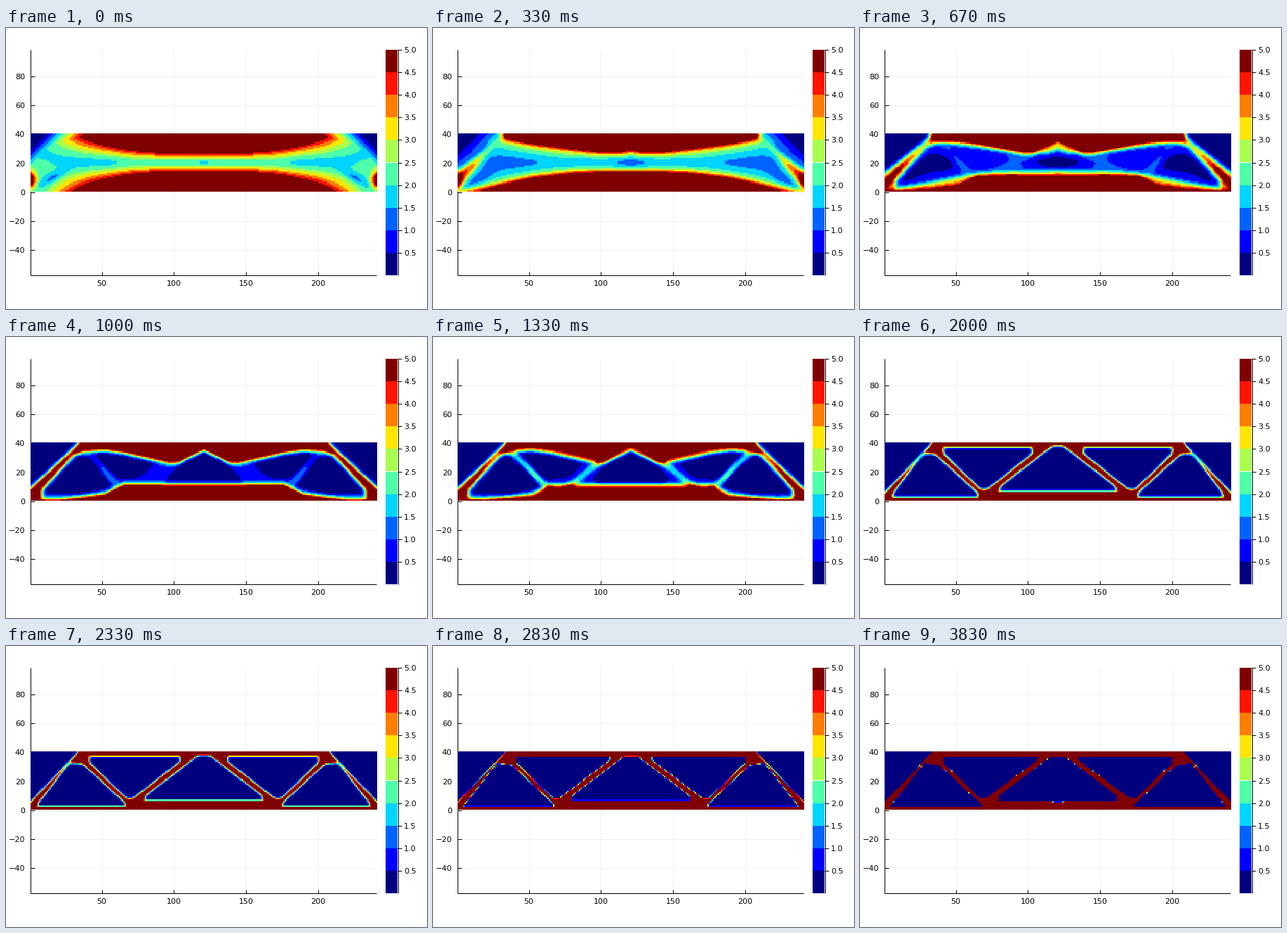
Write a matplotlib script that moves like this. It is 600 by 400 pixels and loops after 4.17 s.

```python
import numpy as np
import matplotlib.pyplot as plt
from matplotlib.animation import FuncAnimation
from matplotlib.patches import Rectangle

plt.rcParams["font.family"] = "DejaVu Sans"
FRAMES, LOOP_MS = 25, 4170
CELL = 493.1 / 240
LEFT, RIGHT, TOP, BOTTOM = 34.8, 527.9, 31, 352

# Left half of the 240 x 40 beam; the right half is its mirror image.
X, Y = np.meshgrid(np.arange(1.0, 121), np.arange(1.0, 41))


def soft_min(fields, r):
    return -r * np.logaddexp.reduce(-np.array(fields) / r)


def beside(a, b):
    """Distance to the line a-b, positive on its right."""
    ex, ey = b[0] - a[0], b[1] - a[1]
    return ((X - a[0]) * ey - (Y - a[1]) * ex) / np.hypot(ex, ey)


def opening(corners, r):
    """Depth inside a convex, clockwise polygon with corners rounded by r."""
    ends = np.roll(corners, -1, axis=0)
    return soft_min([beside(a, b) for a, b in zip(corners, ends)], r)


def corner_void(x, low, high, r=0.8):
    """Depth inside the empty upper corner left of x, above a slanted edge."""
    return soft_min([x - X, -beside((0, low), (x, high))], r)


def solid(depths, softness):
    """1 in the material, 0 in the openings, with soft edges."""
    return np.prod([0.5 - 0.5 * np.tanh(d / (2 * softness)) for d in depths], axis=0)


def bump(cx, cy, rx, ry, slant=0.0):
    dy = Y - cy - slant * (X - cx)
    return np.exp(-((X - cx) / rx) ** 2 - (dy / ry) ** 2)


def bending_beam():
    w = Y - 20.5
    bend = 0.007 * np.minimum(X, 97) * np.abs(w) * np.where(w < 0, 1.05, 1)
    shear = 1.85 + 0.35 * np.clip((X - 54) / 16, 0, 1) - 0.35 * bump(120, 21, 4, 4)
    v = np.hypot(bend, shear)
    v += 0.35 * bump(0, 18, 18, 6) - 0.85 * bump(16, 10, 9, 3.2, 0.5)
    v = np.minimum(v, np.maximum(0.5 + 0.165 * (X + 40 - Y - 12.5), 0))
    return v + 4 * bump(0, 8.5, 4.5, 6)


def hollowing_beam():
    corner = corner_void(31.5, 13, 37)
    roof = np.interp(X, [30, 50, 100, 113, 120], [36.5, 33.5, 27.5, 27.5, 29.5])
    base = np.interp(X, [5, 52, 81, 120], [1, 10.5, 13.5, 14.5])
    core = soft_min([roof - Y, Y - base, beside((5, 8), (24, 32))], 0.6)
    floor = (1.2 - 0.45 * bump(34, 20, 18, 7) - 0.6 * bump(20, 13, 9, 5, 0.6)
             - 0.8 * bump(120.5, 20, 13, 5))
    return 6 * solid([corner, core], 1.2) + floor * solid([corner], 1.2)


def budding_struts():
    corner = corner_void(34.5, 8, 40)
    roof = np.interp(X, [30, 38, 52, 66, 97, 103, 120],
                     [32, 34.5, 35.5, 33.5, 26.5, 27, 35])
    base = np.interp(X, [10, 19, 37, 52, 59, 65], [1.5, 1.2, 3, 5, 8.5, 11.5])
    core = soft_min([roof - Y, Y - base, X - 8, beside((8.5, 9), (30, 32))], 0.5)
    lenses = [
        opening([(9, 6), (32, 32), (41, 31), (57, 10), (37, 4.5)], 0.8),
        opening([(43, 33.5), (60, 33), (87, 26.5), (75, 16), (62, 15)], 0.8),
        opening([(94, 12), (94, 15), (106, 28), (120.5, 36),
                 (135, 28), (147, 15), (147, 12)], 0.8),
    ]
    floor = 0.8 + 0.5 * bump(55, 17, 9, 5, -0.9)
    return 6 * solid([corner, core], 1.0) + floor * solid([corner] + lenses, 0.8)


# Corners of each opening when the truss appears and when it has settled.
SIDE = (np.array([(6, 2.8), (6.5, 6.5), (27, 33), (35, 33), (65, 6), (65, 2.8)]),
        np.array([(4.3, 2.5), (4.6, 3), (28, 32.5), (39, 30.8), (67.3, 4.2), (67.3, 2.5)]))
INNER = (np.array([(41, 33), (41, 37.2), (102, 37.2), (103, 33), (72, 8), (67, 8)]),
         np.array([(41.5, 32.3), (41.5, 36.5), (106.8, 36.5), (106.8, 35), (70.7, 8.2), (66.5, 8.2)]))
MIDDLE = (np.array([(79, 6.8), (80, 10), (117, 38.5), (124, 38.5), (161, 10), (162, 6.8)]),
          np.array([(79.5, 6.5), (79.5, 10), (115, 36.5), (126, 36.5), (161.5, 10), (161.5, 6.5)]))


def truss(n):
    f = np.clip((n - 10) / 7, 0, 1)
    times = [10, 14, 17, 20]
    r = np.interp(n, times, [0.8, 0.4, 0.08, 0.03])
    softness = np.interp(n, times, [0.65, 0.42, 0.12, 0.02])
    depths = [opening((1 - f) * a + f * b, r) for a, b in (SIDE, INNER, MIDDLE)]
    v = 6 * solid(depths + [corner_void(33.3, 5.1, 39.6, r)], softness)
    if n >= 17:
        # The lower chord's top row fills in from its ends towards the middle.
        x = X[5, 82:]
        front, width = 101 + 3.4 * (n - 17), 18 - 3 * (n - 17)
        if n < 23:
            v[5, 82:] = 0.7 + 5 * np.clip((front - x) / width, 0, 1)
        else:
            v[5, 82:] = np.where(x < 117, 5, 0)
    return v


def build_frames():
    keys = [0, 2, 6, 10]
    stages = [np.clip(v, 0, 6) for v in
              (bending_beam(), hollowing_beam(), budding_struts(), truss(10))]
    result = []
    for n in range(FRAMES):
        if n < 10:
            k = np.searchsorted(keys, n, side="right") - 1
            f = (n - keys[k]) / (keys[k + 1] - keys[k])
            half = (1 - f) * stages[k] + f * stages[k + 1]
        else:
            half = truss(n)
        result.append(np.clip(np.hstack([half, half[:, ::-1]]), 0, 5))
    return result


fig = plt.figure(figsize=(6, 4), dpi=100, facecolor="white")
ax = fig.add_axes([0, 0, 1, 1])
ax.axis("off")
JET = plt.get_cmap("jet", 10)


def line(xs, ys, color="black", z=2):
    ax.plot(xs, ys, color=color, lw=0.72, zorder=z, solid_capstyle="butt")


def label(x, y, text, align):
    ax.text(x, y + 1, text, ha=align, va="center", fontsize=8)


for tick in range(50, 201, 50):
    px = LEFT + (tick - 0.5) * CELL
    line([px, px], [TOP, BOTTOM], "#f0f0f0", z=1)
    line([px, px], [BOTTOM, BOTTOM - 5])
    label(px, 363, str(tick), "center")
for tick in range(-40, 81, 20):
    py = 191.5 - (tick - 20.5) * CELL
    line([LEFT, RIGHT], [py, py], "#f0f0f0", z=1)
    line([LEFT, LEFT + 6], [py, py])
    label(27, py, str(tick).replace("-", "\u2212"), "right")
line([LEFT, LEFT], [TOP, BOTTOM])
line([LEFT, RIGHT], [BOTTOM, BOTTOM])

band = (BOTTOM - TOP) / 10
for i in range(10):
    y = BOTTOM - (i + 1) * band
    ax.add_patch(Rectangle((540.5, y), 17.5, band, color=JET(i), lw=0, antialiased=False))
    line([558, 564], [y, y])
    label(567, y, f"{(i + 1) / 2:.1f}", "left")
line([558.5, 558.5], [TOP, BOTTOM])

fields = build_frames()
heat = ax.imshow(fields[0], cmap=JET, vmin=0, vmax=5, origin="lower", aspect="auto",
                 interpolation="nearest", zorder=3,
                 extent=(LEFT, RIGHT, 191.5 + 20 * CELL, 191.5 - 20 * CELL))
ax.set_xlim(0, 600)
ax.set_ylim(400, 0)


def update(n):
    heat.set_data(fields[n])
    return (heat,)


anim = FuncAnimation(fig, update, frames=FRAMES, interval=LOOP_MS / FRAMES, repeat=True)
plt.show()
```
